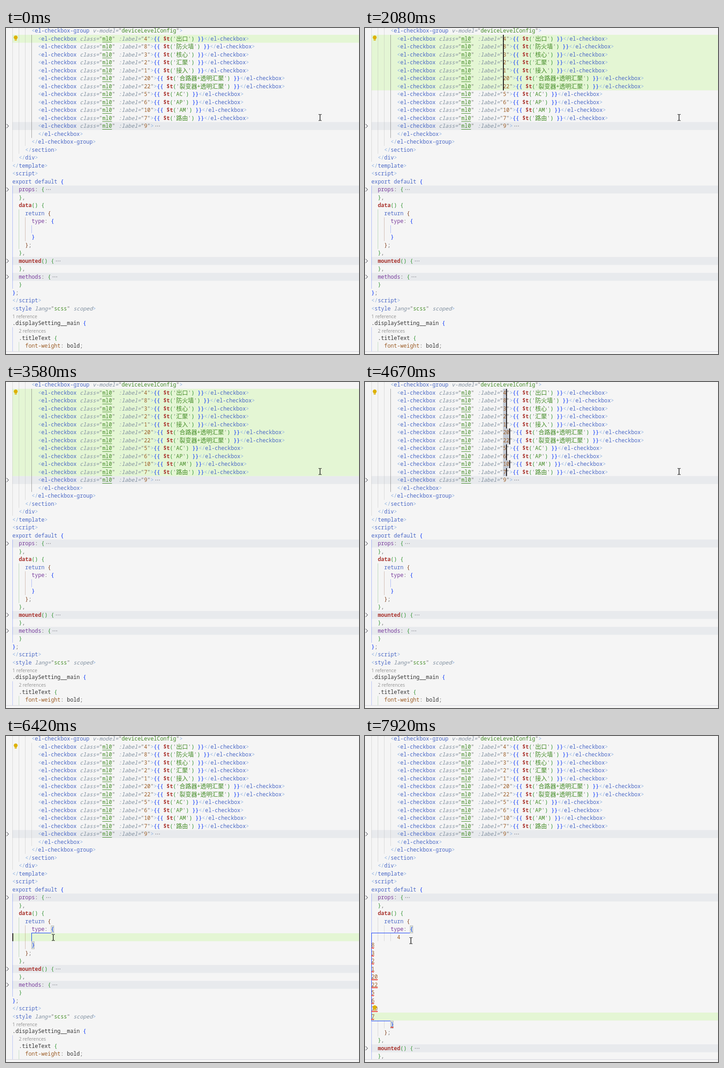
Recreate the animation shown at these times as an HTML page with a canvas. Size 778x719 px, loop 8 s.

```html
<!DOCTYPE html>
<html lang="en">
<head>
<meta charset="utf-8">
<title>Multi-cursor copy and paste</title>
<style>
  html, body { margin: 0; width: 100%; height: 100%; overflow: hidden; background: #f5f5f5; }
  canvas { display: block; }
</style>
</head>
<body>
<canvas id="stage" width="778" height="719"></canvas>
<script>
const ctx = document.getElementById('stage').getContext('2d');
const LOOP = 8000, WIDTH = 778, LEFT = 14, CHAR = 7.08, ROW = 17.5, TOP = -2.5, FLOOR = 713;
const MONO = '11.8px "Noto Sans Mono", monospace';
const CJK = '13px "Noto Sans CJK SC", "Noto Sans CJK", sans-serif';
const LENS = '10.4px "Open Sans", "Noto Sans", sans-serif';

// Token styles: the first letter of each token selects one.
const STYLES = {
  p: ['#91b3e0'], t: ['#4b69c6'], a: ['#8190a0', 'italic '], q: ['#777777'],
  s: ['#448c27'], u: ['#448c27'], n: ['#9c5d27'], f: ['#aa3731', 'bold '],
  v: ['#7a3e9d'], d: ['#333333'], 1: ['#0431fa'], 2: ['#319331'], 3: ['#7b3814']
};

const close = (col, tag) => ({ col, tokens: ['p</', 't' + tag, 'p>'] });
const code = (col, ...tokens) => ({ col, tokens });
const folded = (col, ...tokens) => ({ col, tokens, folded: true });
const lens = (col, text) => ({ col, lens: text });
const boxHead = id => ['p<', 'tel-checkbox', 'a class=', 'q"', 'uml0', 'q"', 'a :label=', 'q"', 'n' + id, 'q"', 'p>'];
const checkbox = ([id, label]) => code(8, ...boxHead(id), '1{{ ', 'f$t', '2(', 'q\'', 's' + label, 'q\'', '2)',
  '1 }}', 'p</', 'tel-checkbox', 'p>');

const LEVELS = [['4', '出口'], ['8', '防火墙'], ['3', '核心'], ['2', '汇聚'], ['1', '接入'],
  ['20', '合路器+透明汇聚'], ['22', '裂变器+透明汇聚'], ['5', 'AC'], ['6', 'AP'], ['10', 'AM'], ['7', '路由']];
const ids = LEVELS.map(level => level[0]);

const HEAD = [
  code(6, 'p<', 'tel-checkbox-group', 'a v-model=', 'q"', 'sdeviceLevelConfig', 'q"', 'p>'),
  ...LEVELS.map(checkbox),
  folded(8, ...boxHead('9')),
  close(8, 'el-checkbox'),
  close(6, 'el-checkbox-group'),
  close(4, 'section'),
  close(2, 'div'),
  close(0, 'template'),
  code(0, 'p<', 'tscript', 'p>'),
  code(0, 'texport default ', '1{'),
  folded(2, 'vprops', 'q: ', '2{'),
  code(2, '2}', 'q,'),
  code(2, 'fdata', '2() {'),
  code(4, 'treturn ', '3{'),
  code(6, 'vtype', 'q: ', '1{')
];
const TAIL = [
  code(6, '1}'),
  code(4, '3}', 'q;'),
  code(2, '2}', 'q,'),
  folded(2, 'fmounted', '2() {'),
  code(2, '2}', 'q,'),
  folded(2, 'vmethods', 'q: ', '2{'),
  code(2, '2}'),
  code(0, '1}', 'q;'),
  close(0, 'script'),
  code(0, 'p<', 'tstyle', 'a lang=', 'q"', 'sscss', 'q"', 'a scoped', 'p>'),
  lens(0, '1 reference'),
  code(0, 'd.displaySetting__main ', '1{'),
  lens(2, '2 references'),
  code(2, 'd.titleText ', '2{'),
  code(4, 'nfont-weight', 'q: ', 'dbold', 'q;')
];
const BEFORE = [...HEAD, code(0), ...TAIL];
const AFTER = [...HEAD, code(8, 'n4'), ...ids.slice(1).map(id => code(0, 'n' + id)), ...TAIL];

// Time at which each caret is added, from the first line down.
const CARETS = [0, 1250, 1500, 1920, 2000, 2080, 2080, 2170, 2420, 2580, 3080];
const SELECT = 3670, CLICK = 6420, PASTE = 7080, BULB = 7330, ERRORS = 7500;
// Moments when the carets toggle; they start hidden.
const BLINKS = [420, 920, 1250, 3000, 3080, 3580, 3670, 4170, 4670, 5170, 5670, 6170, 6420, 6920, 7080, 7580];
const POINTER = [[4950, 692, 197], [5790, 77, 561], [6330, 104, 444], [6580, 104, 444], [7370, 210, 480], [7900, 101, 451]];

const colX = col => LEFT + col * CHAR;
const rowY = row => TOP + row * ROW;

function rect(color, x, y, w, h) {
  ctx.fillStyle = color;
  ctx.fillRect(x, y, w, h);
}

function stroke(color, width, ...points) {
  ctx.strokeStyle = color;
  ctx.lineWidth = width;
  ctx.beginPath();
  points.forEach(([x, y]) => ctx.lineTo(x, y));
  ctx.stroke();
}

function guide(col, from, to, color = 'rgba(170,170,170,.38)') {
  rect(color, Math.round(colX(col)), rowY(from), 1, (to - from + 1) * ROW);
}

function drawToken(token, x, base) {
  const [color, face = ''] = STYLES[token[0]];
  const start = x;
  ctx.fillStyle = color;
  for (const part of token.slice(1).match(/[\u4e00-\u9fff]+|[^\u4e00-\u9fff]+/g)) {
    const wide = part.charCodeAt(0) > 0x4e00;
    ctx.font = face + (wide ? CJK : MONO);
    ctx.fillText(part, x, base);
    x += wide ? part.length * 13 : part.length * CHAR;
  }
  if (token[0] === 'u') rect(color, start, base + 3, x - start, 1);
  return x;
}

function drawLines(lines) {
  let y = TOP;
  for (const line of lines) {
    let x = colX(line.col);
    if (line.lens) {
      ctx.font = LENS;
      ctx.fillStyle = '#919191';
      ctx.fillText(line.lens, x, y + 12);
      y += 15;
      continue;
    }
    const mid = y + ROW / 2;
    for (const token of line.tokens) x = drawToken(token, x, mid + 3.8);
    if (line.folded) {
      for (let i = 0; i < 3; i++) rect('#7d7d85', x + 4 + i * 4, mid - 0.7, 1.5, 1.5);
      stroke('#6b6b73', 1.1, [1.3, mid - 4.3], [5.8, mid], [1.3, mid + 4.3]);
    }
    y += ROW;
  }
}

function drawFolds(lines) {
  lines.forEach((line, i) => {
    if (line.folded) rect('#e8eaed', LEFT, rowY(i), WIDTH - LEFT, ROW);
  });
}

function drawGuides(t) {
  const pasted = t >= PASTE;
  guide(0, 0, 16);
  guide(2, 0, 15);
  guide(4, 0, 14);
  guide(6, 1, 13, t < CLICK ? 'rgba(119,119,119,.69)' : undefined);
  guide(0, 20, pasted ? 42 : 32, 'rgba(4,49,250,.3)');
  if (pasted) {
    guide(2, 23, 25);
    guide(2, 36, 37);
    guide(4, 24, 25);
    guide(4, 36, 36);
    guide(6, 25, 25);
    return;
  }
  guide(2, 23, 27, 'rgba(49,147,49,.3)');
  guide(4, 24, 26, 'rgba(123,56,20,.3)');
  guide(6, 25, 25, 'rgba(4,49,250,.3)');
  rect('rgba(4,49,250,.25)', LEFT, 660, 1, 53);
  rect('rgba(49,147,49,.25)', 28, 692.5, 1, 20.5);
}

function drawBracketPair(col, last) {
  const blue = '#0431fa', x = Math.round(colX(col));
  const top = rowY(25) - 1, bottom = rowY(last);
  rect(blue, x, top, colX(12) - x, 1);
  rect(blue, x, top, 1, bottom - top);
  if (col < 6) rect(blue, x, Math.round(bottom), colX(6) - x, 1);
  for (const [c, row] of [[12, 24], [6, last]]) {
    const bx = Math.round(colX(c)), by = Math.round(rowY(row));
    rect('rgba(0,100,0,.1)', bx, by, 7, 17);
    ctx.strokeStyle = '#b9b9b9';
    ctx.lineWidth = 1;
    ctx.strokeRect(bx + 0.5, by + 0.5, 6, 16);
  }
}

function squiggle(col, row, chars) {
  const y = rowY(row) + 15, points = [];
  for (let i = 0; i <= chars * CHAR / 2; i++) points.push([colX(col) + i * 2, y + (i % 2 ? -1 : 1)]);
  stroke('#e51400', 1.1, ...points);
}

function drawBulb(row) {
  const y = rowY(row) + ROW / 2;
  ctx.fillStyle = '#ddb100';
  ctx.beginPath();
  ctx.arc(21.4, y - 3, 4.3, 0, Math.PI * 2);
  ctx.fill();
  rect('#ddb100', 19.2, y, 4.4, 4);
  rect('#f5f5f5', 20.2, y + 1.6, 2.4, 0.9);
}

function drawCaret(col, row) {
  rect('#1f1a1c', Math.round(colX(col)), rowY(row), 2, ROW);
}

function drawPointer(t) {
  let i = 0;
  while (i < POINTER.length - 2 && t >= POINTER[i + 1][0]) i++;
  const [t0, x0, y0] = POINTER[i], [t1, x1, y1] = POINTER[i + 1];
  const k = Math.min(1, Math.max(0, (t - t0) / (t1 - t0)));
  const ease = k * k * (3 - 2 * k);
  const x = Math.round(x0 + (x1 - x0) * ease), y = Math.round(y0 + (y1 - y0) * ease);
  rect('#111', x - 0.5, y - 6, 1.4, 13);
  for (const edge of [y - 7, y + 6.5]) {
    rect('#111', x - 3, edge, 2.6, 1.2);
    rect('#111', x + 0.8, edge, 2.6, 1.2);
  }
}

function draw(t) {
  const pasted = t >= PASTE, clicked = t >= CLICK, selecting = t >= SELECT && !clicked;
  const lines = pasted ? AFTER : BEFORE;
  const carets = CARETS.filter(start => t >= start).length;
  const visible = BLINKS.filter(moment => t >= moment).length;
  // Between the fixed toggles at 1250 and 3000 every added caret stays lit.
  const lit = visible % 2 === 1;

  rect('#f5f5f5', 0, 0, WIDTH, 719);
  ctx.save();
  ctx.beginPath();
  ctx.rect(0, 0, WIDTH, FLOOR);
  ctx.clip();

  drawFolds(lines);
  if (clicked) rect('#e4f6d4', LEFT, rowY(pasted ? 35 : 25), WIDTH - LEFT, ROW);
  else if (!selecting) rect('#e4f6d4', LEFT, rowY(1), WIDTH - LEFT, carets * ROW);
  if (selecting) ids.forEach((id, i) => rect('#c3c9d3', colX(41), rowY(i + 1), id.length * CHAR, ROW));

  drawGuides(t);
  if (clicked) drawBracketPair(pasted ? 0 : 6, pasted ? 36 : 26);
  drawLines(lines);

  if (t >= ERRORS) {
    ids.slice(1).forEach((id, i) => squiggle(0, 26 + i, id.length));
    squiggle(6, 36, 1);
  }
  if (lit) {
    if (pasted) drawCaret(1, 35);
    else if (clicked) drawCaret(0, 25);
    else ids.slice(0, carets).forEach((id, i) => drawCaret(41 + (selecting ? id.length : 0), i + 1));
  }
  drawBulb(t >= BULB ? 34 : 1);
  drawPointer(t);
  ctx.restore();
  rect('#d3d3da', 0, FLOOR, WIDTH, 1);
}

const began = performance.now();
function tick() {
  draw((performance.now() - began) % LOOP);
  requestAnimationFrame(tick);
}
tick();
</script>
</body>
</html>
```
